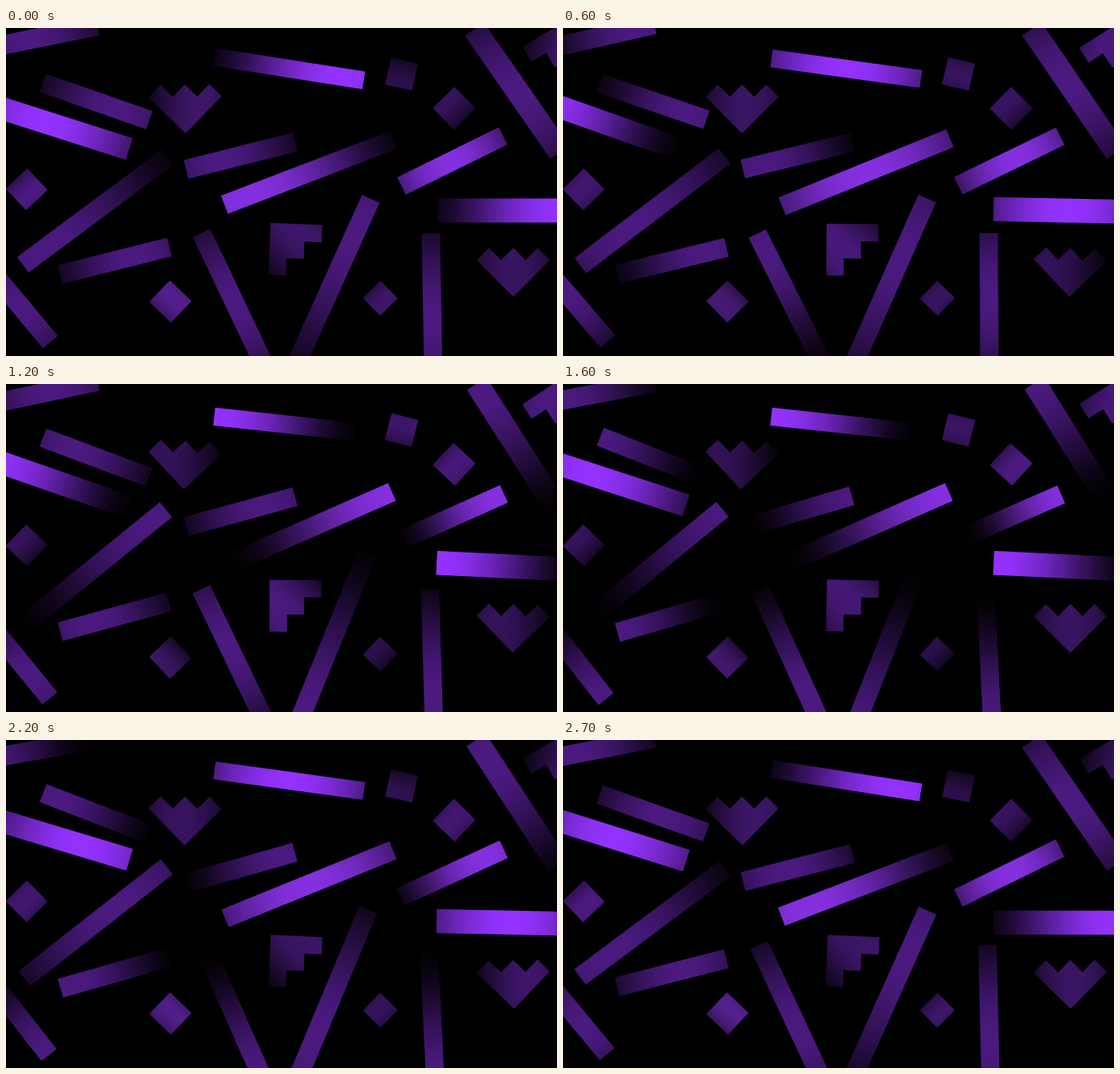
An HTML page for the animation above (2.8 s loop, 677 px wide and 403 px high).

```html
<!DOCTYPE html>
<html lang="en">
<head>
<meta charset="utf-8">
<title>Drifting bars</title>
<style>
  html, body { margin: 0; width: 100%; height: 100%; overflow: hidden; background: #000; }
  svg { display: block; width: 677px; height: 403px; }
</style>
</head>
<body>
<svg id="stage" viewBox="0 0 677 403"></svg>
<script>
const LOOP = 2800, STEP = 100, SWAY = 1.45;
const VIVID = '#9432ff', MID = '#8530e0', DIM = '#4b1a80', DARK = '#3e166a';
const CW = 1, CCW = -1;
const stage = document.getElementById('stage');
const shapes = [];

function add(parent, name, attrs) {
  const el = document.createElementNS('http://www.w3.org/2000/svg', name);
  for (const key in attrs) el.setAttribute(key, attrs[key]);
  return parent.appendChild(el);
}

// A shape sways once per loop; its glow slides along the axis
// from `low` to `reach` (in half lengths) and gets there at `peak`.
function shape(path, x, y, half, angle, peak, turn, options) {
  const o = { axis: 0, soft: 1, low: -1.1, reach: 0.7, pulse: 0, color: DIM, ...options };
  const id = 'glow' + shapes.length;
  const grad = add(stage, 'linearGradient', {
    id, gradientUnits: 'userSpaceOnUse', gradientTransform: `rotate(${o.axis})`, y1: 0, y2: 0
  });
  for (let i = -8; i <= 8; i++) {
    const light = Math.cos(i / 8 * Math.PI / 2) ** 1.7;
    add(grad, 'stop', { offset: 0.5 + i / 16, 'stop-color': o.color, 'stop-opacity': light });
  }
  const el = add(stage, 'path', { d: path, fill: `url(#${id})` });
  shapes.push({ ...o, x, y, half, angle, peak, turn, grad, el });
}

function bar(turn, x, y, half, angle, peak, { width = 23.7, ...rest } = {}) {
  const r = width / 2;
  shape(`M${-half} ${-r}H${half}V${r}H${-half}Z`, x, y, half, angle, peak, turn, rest);
}

function square(turn, x, y, size, angle, peak, color) {
  const r = size / 2;
  shape(`M${-r} ${-r}H${r}V${r}H${-r}Z`, x, y, r, angle, peak, turn,
    { soft: 1.6, low: -0.9, reach: 0.4, pulse: 0.15, color });
}

// Three-step staircase, lit along its diagonal.
function stair(x, y, angle, peak, color) {
  const u = 21.2, r = u * 1.5;
  const steps = `v${u}h${-u}`.repeat(3);
  shape(`M${-r} ${-r}h${3 * u}${steps}Z`, x, y, r, angle, peak, CCW,
    { axis: 135, soft: 1.45, low: -0.9, reach: 0.6, pulse: 0.1, color });
}

bar(CW, 348, 50, 92.7, 7.5, 0, { width: 22, color: VIVID });
bar(CW, 288.3, 156.8, 69.3, 165, 400);
bar(CW, 372.3, 177.3, 111.3, 157.6, 0, { color: MID });
bar(CW, 110, 224.5, 111.3, 142, 150);
bar(CW, 133.5, 286, 69.3, -15, 400);
bar(CW, 398, 321, 122, 293, 200);
bar(CW, 523.5, 338.5, 86.5, 268.3, 500, { reach: 0.1, width: 22.5 });

bar(CCW, 42, 11.7, 72, -11.4, 700);
bar(CCW, 110.5, 90.3, 69.5, 20.2, 400);
bar(CCW, 60, 119.5, 96, 18.2, 2250, { reach: 0.35, width: 28, color: VIVID });
bar(CCW, 548.3, 163.4, 69.6, 155, 200, { reach: 0.1, color: MID });
bar(CCW, 620, 224.3, 91, 1.5, 0, { width: 29.5, color: VIVID });
bar(CCW, 628, 77, 92, 56.5, 200, { reach: 0.1, width: 28.5 });
bar(CCW, 277.6, 330.5, 87, 244.8, 650);
bar(CCW, 11.3, 334, 67.5, 230.8, 500, { reach: 0.2 });

square(CW, 486, 56.5, 34, -77, 1200, DARK);
square(CCW, 550.7, 98.7, 37.3, 44, 1600, DIM);
square(CW, 25.4, 198.3, 36.4, 45, 0, DIM);
square(CCW, 202, 336, 36.8, -45, 2600, '#552090');
square(CW, 460, 332, 30.3, 44, 100, DARK);

stair(220, 84.5, -134.4, 100, DARK);
stair(355.6, 272.6, 1.4, 1000, DIM);
stair(623.3, 285.3, -134.8, 2200, DARK);
stair(678.2, 34.2, 58.2, 1000, DIM);

function draw(t) {
  for (const s of shapes) {
    const wave = Math.cos(2 * Math.PI * (t - s.peak) / LOOP);
    const rise = (1 + wave) / 2;
    const glow = s.half * (s.low + (s.reach - s.low) * rise);
    const span = 1.95 * s.half * s.soft;
    s.el.setAttribute('transform',
      `translate(${s.x} ${s.y}) rotate(${s.angle + s.turn * SWAY * wave})`);
    s.el.setAttribute('opacity', 1 - 2 * s.pulse * (1 - rise));
    s.grad.setAttribute('x1', glow - span);
    s.grad.setAttribute('x2', glow + span);
  }
}

const start = performance.now();
function tick() {
  const t = performance.now() - start;
  draw(Math.floor(t / STEP) * STEP % LOOP);
  requestAnimationFrame(tick);
}
draw(0);
requestAnimationFrame(tick);
</script>
</body>
</html>
```
